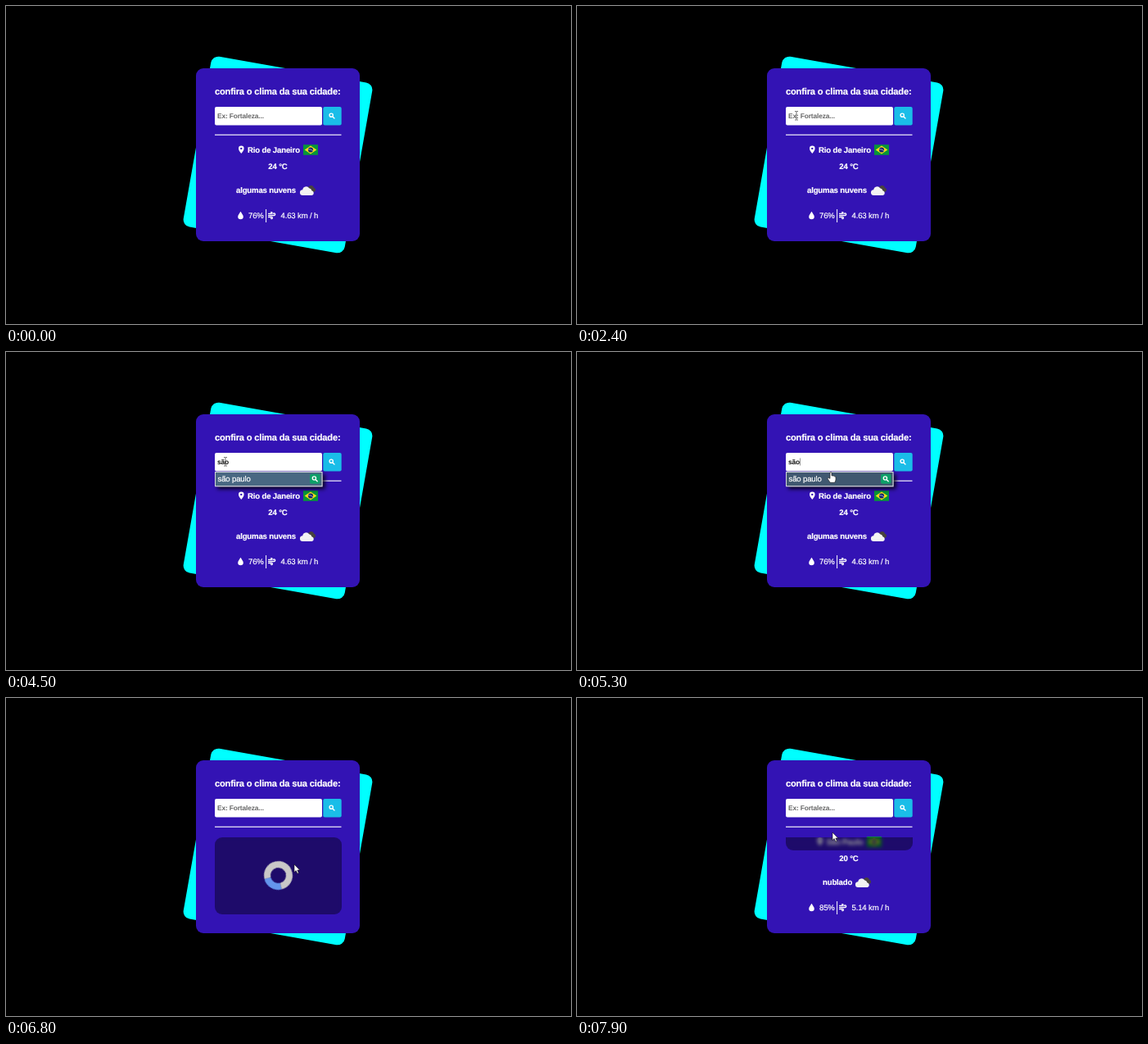
Recreate the animation shown at these times as an HTML page. Size 690 by 388 pixels, loop 8 s.

```html
<!DOCTYPE html>
<html lang="pt-BR">
<head>
<meta charset="utf-8">
<title>Clima</title>
<style>
  html, body { margin: 0; width: 100%; height: 100%; overflow: hidden; background: #000; }
  #stage { position: relative; width: 690px; height: 388px; overflow: hidden; background: #000; }
  svg { position: absolute; left: 0; top: 0; }
  text { font-family: "Liberation Sans", Arial, sans-serif; font-size: 9.6px; letter-spacing: -.017em;
    fill: #fff; stroke: #fff; stroke-width: .2; white-space: pre; text-rendering: geometricPrecision; }
  .b { font-weight: 700; }
  #title { font-size: 11.15px; }
  #field { font-size: 8.4px; stroke: none; }
  #clip { position: absolute; left: 255px; top: 170px; width: 155px; height: 94px; overflow: hidden; }
  #panel { width: 155px; height: 94px; border-radius: 9px; background: rgba(0, 0, 0, .41); backdrop-filter: blur(2px); }
  #ring { position: absolute; left: 60px; top: 29px; width: 35px; height: 35px; box-sizing: border-box;
    border: 8.7px solid #c9c8c8; border-top-color: #6495ed; border-radius: 50%; }
</style>
</head>
<body>
<div id="stage">
  <svg width="690" height="388">
    <defs>
      <g id="glass" fill="none" stroke="#fff" stroke-width="1.4" stroke-linecap="round">
        <circle cx="-.8" cy="-.8" r="2.1"/><path d="M.9 .9L3 3"/>
      </g>
      <path id="pin" fill="#fff" fill-rule="evenodd"
        d="M3.3 9.5C1.2 6.8 0 5 0 3.4a3.3 3.3 0 0 1 6.6 0C6.6 5 5.4 6.8 3.3 9.5ZM3.3 2.2a1.2 1.2 0 1 0 .01 0Z"/>
      <g id="flag">
        <rect width="18" height="12.6" fill="#079639"/>
        <path d="M1.7 6.3L9 1.3 16.3 6.3 9 11.3Z" fill="#f8dc16"/>
        <circle cx="9" cy="6.3" r="3.1" fill="#14246e"/>
        <path d="M6.1 5.6Q9.4 5.3 11.8 7.4" fill="none" stroke="#fff" stroke-width=".6"/>
      </g>
      <g id="cloud">
        <path d="M8 7a2.6 2.6 0 0 1 2.4-4.3 3.7 3.7 0 0 1 6.7 1A2.7 2.7 0 0 1 16.5 9H9Z" fill="#48423f"/>
        <path d="M3.5 13a3.4 3.4 0 0 1-.3-6.8 4.4 4.4 0 0 1 8-2 3.7 3.7 0 0 1 3.2 3 3 3 0 0 1 .3 5.8Z" fill="#f3f3f3"/>
      </g>
      <filter id="shade" x="-20%" y="-60%" width="140%" height="260%">
        <feDropShadow dx="3" dy="3" stdDeviation="2.5" flood-color="#000" flood-opacity=".85"/>
      </filter>
    </defs>

    <rect x="232" y="76" width="200" height="211" rx="9" fill="#0ff" transform="rotate(10 332 181.5)"/>
    <rect x="232" y="76" width="200" height="211" rx="9" fill="#3313b4"/>
    <text id="title" class="b" x="255" y="108.3">confira o clima da sua cidade:</text>
    <rect x="255" y="123" width="131" height="22.5" rx="2" fill="#fff"/>
    <text id="field" class="b" x="258" y="137"></text>
    <path id="caret" d="M272.5 129.5V138.5" stroke="#555" stroke-width=".6"/>
    <rect x="387.3" y="123" width="22.4" height="22.5" rx="2" fill="#1abde8"/>
    <use href="#glass" x="398" y="134"/>
    <rect x="255" y="156.6" width="154.5" height="1.3" fill="#e4dff6"/>

    <g id="weather">
      <use id="pinAt" href="#pin" y="170.5"/>
      <text id="city" class="b" y="178.5"></text>
      <use id="flagAt" href="#flag" y="169.2"/>
      <text id="temp" class="b" x="332" y="199" text-anchor="middle"></text>
      <text id="sky" class="b" y="228"></text>
      <use id="cloudAt" href="#cloud" y="218"/>
      <path d="M286.5 250.8C287.8 253 289.8 255.3 289.8 257.1a3.3 3.2 0 0 1-6.6 0C283.2 255.3 285.2 253 286.5 250.8Z" fill="#fff"/>
      <text id="humid" x="296" y="259"></text>
      <path d="M317.6 248V264" stroke="#fff"/>
      <g fill="none" stroke="#fff" stroke-width="1.3" stroke-linecap="round">
        <path d="M320.6 253.4H324.2a.9 .9 0 1 0-.7-1.5"/>
        <path d="M320.6 255.5H327.4a1.3 1.3 0 1 0-1.1-2.1"/>
        <path d="M320.6 257.5H324.4a1 1 0 1 1-.8 1.6"/>
      </g>
      <text id="wind" x="335.5" y="259"></text>
    </g>

    <g id="list" filter="url(#shade)"></g>
  </svg>

  <div id="clip"><div id="panel"><div id="ring"></div></div></div>

  <svg width="690" height="388">
    <g id="cursor">
      <path id="arrow" d="M0 0V9.6L2.2 7.6 3.8 11.2 5.4 10.5 3.9 7H6.8Z" fill="#fff" stroke="#111" stroke-width=".6"/>
      <path id="beam" d="M-2-5.5H-.6L0-5 .6-5.5H2M0-5V4.5M-2 5H-.6L0 4.5 .6 5H2" fill="none" stroke="#333" stroke-width=".7"/>
      <path id="hand" d="M-1 0Q0-1 1 0V4Q2 3.2 2.8 4.3 3.8 3.7 4.5 4.9 6 4.6 6 6V9Q5.6 10.5 4.8 12.3H-.8Q-2.5 9.8-4 7.4-3.2 5.6-1 7.4Z"
        fill="#fff" stroke="#111" stroke-width=".6"/>
    </g>
  </svg>
</div>

<script>
const LOOP = 8000, STEP = 100;
const LOAD = 5690, DONE = 7688, SLIDE = 400;
const $ = id => document.getElementById(id);
const show = (id, on) => $(id).style.display = on ? '' : 'none';
const start = performance.now();

const reports = [
  { city: 'Rio de Janeiro', pin: 284, flag: 363, temp: '24 °C', sky: 'algumas nuvens', skyX: 281, cloud: 359, humid: '76%', wind: '4.63 km / h' },
  { city: 'São Paulo', pin: 293.5, flag: 354, temp: '20 °C', sky: 'nublado', skyX: 300, cloud: 340, humid: '85%', wind: '5.14 km / h' }
];

// time, typed text, suggestion count
const typing = [
  [0, '', 0], [3400, 's', 4], [3700, 'sã', 1], [3900, 'são', 1],
  [5500, 'são paulo', 0], [5700, '', 0]
];
const cities = ['são paulo', 'salvador', 'santos', 'sorocaba'];

// time, x, y of the pointer
const path = [
  [1100, 193, 165], [1500, 250, 152], [1900, 288, 146], [2000, 288, 166], [2100, 288, 166],
  [2200, 288, 160], [2400, 268, 134], [5000, 268, 134], [5300, 310, 147], [5500, 312, 150],
  [5900, 352, 203], [7300, 352, 203], [7700, 312, 164], [8000, 312, 164]
];

const paused = (el, frames, opts) => {
  const a = el.animate(frames, { fill: 'both', ...opts });
  a.pause();
  return a;
};
const slide = (from, to, delay, fill) => paused($('panel'),
  [{ transform: `translateY(${from}px)` }, { transform: `translateY(${to}px)` }],
  { duration: SLIDE, delay, easing: 'ease', fill });
const motions = [
  slide(-96, 0, LOAD, 'both'),
  slide(0, -94, DONE, 'forwards'),
  paused($('ring'), [{ transform: 'rotate(0deg)' }, { transform: 'rotate(360deg)' }],
    { duration: 700, delay: LOAD, iterations: 4 })
];

function setReport(r) {
  for (const id of ['city', 'temp', 'sky', 'humid', 'wind']) $(id).textContent = r[id];
  const xs = { pinAt: r.pin, city: r.pin + 11, flagAt: r.flag, sky: r.skyX, cloudAt: r.cloud };
  for (const id in xs) $(id).setAttribute('x', xs[id]);
}

function setList(count, hover) {
  const row = (name, i) => {
    const y = 147 + i * 17;
    return `<rect x="256" y="${y}" width="129.5" height="16.2" fill="${hover && !i ? '#40596f' : '#4a6882'}"/>
      <text x="258.5" y="${y + 10.6}">${name}</text>
      <rect x="371" y="${y + 1.8}" width="12.5" height="12" rx="2" fill="#0f9f68"/>
      <use href="#glass" x="377.2" y="${y + 7.8}"/>`;
  };
  $('list').innerHTML = count
    ? `<rect x="255" y="146" width="131.5" height="${count * 17 + 1.2}" fill="#d5d8dc"/>` +
      cities.slice(0, count).map(row).join('')
    : '';
}

function pointer(t) {
  const i = path.findIndex(p => p[0] > t);
  if (i <= 0) return null;
  const [t0, x0, y0] = path[i - 1], [t1, x1, y1] = path[i];
  const k = (t - t0) / (t1 - t0);
  return [x0 + (x1 - x0) * k, y0 + (y1 - y0) * k];
}

function draw(t) {
  const [, typed, count] = typing.findLast(s => s[0] <= t);
  const field = $('field');
  field.textContent = typed || 'Ex: Fortaleza...';
  field.style.fill = typed ? '#111' : '#686868';
  show('caret', typed === 'são' && t >= 5000);

  setReport(reports[t < LOAD ? 0 : 1]);
  show('weather', t < LOAD || t > DONE);
  show('clip', t >= LOAD);
  motions.forEach(m => m.currentTime = t);

  const at = pointer(t);
  show('cursor', at);
  let kind = 'arrow';
  if (at) {
    const [x, y] = at;
    $('cursor').setAttribute('transform', `translate(${x} ${y})`);
    if (x > 255 && x < 386) {
      if (count && y > 145) kind = 'hand';
      else if (y > 123 && y < 145) kind = 'beam';
    }
  }
  for (const id of ['arrow', 'beam', 'hand']) show(id, id === kind);
  setList(count, kind === 'hand');
}

let last = -1;
function tick() {
  const t = Math.floor((performance.now() - start) / STEP) * STEP % LOOP;
  if (t !== last) draw(last = t);
  requestAnimationFrame(tick);
}
tick();
</script>
</body>
</html>
```
